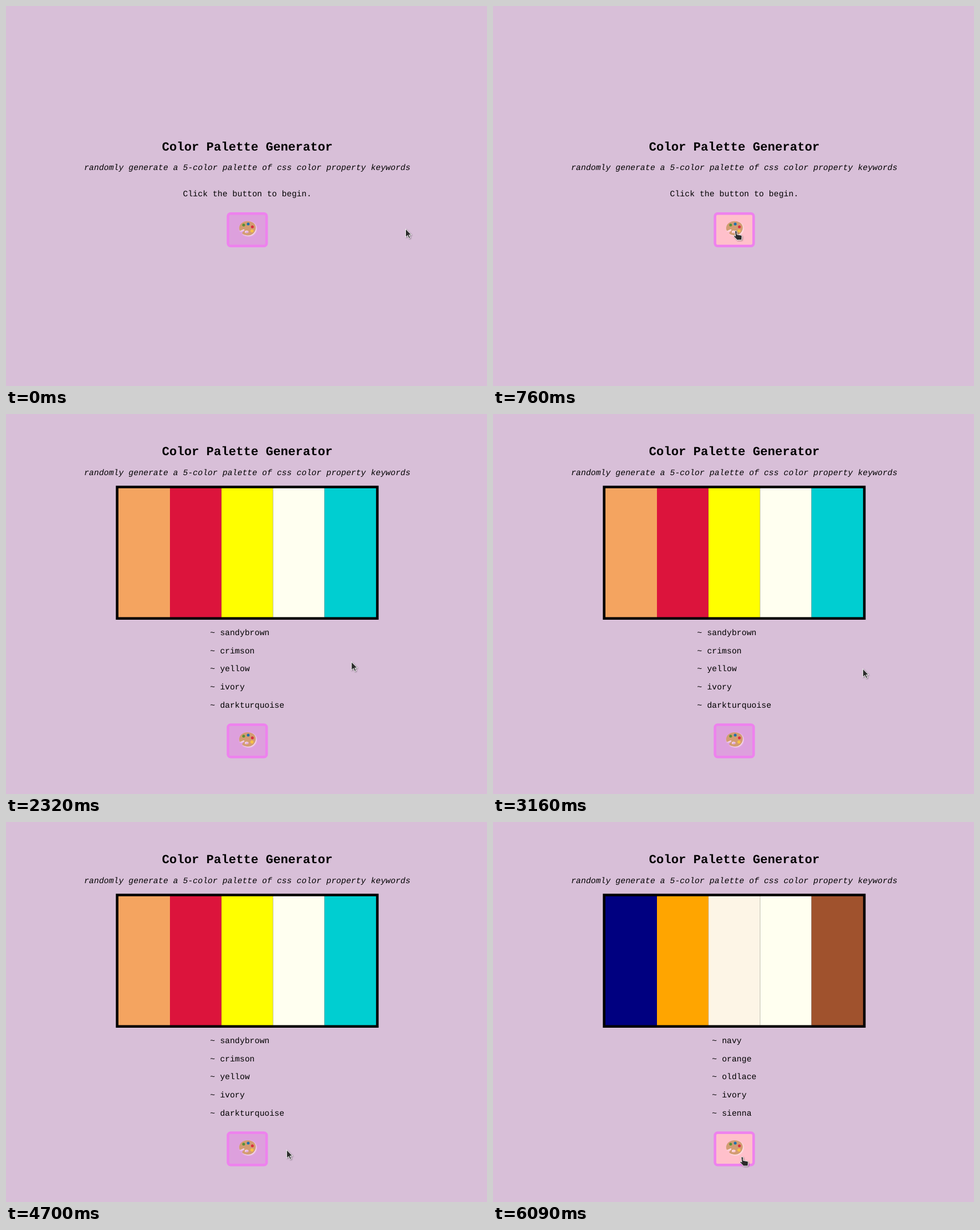
Write an HTML page that moves like this. It is 842 px wide and 665 px high and loops after 8000 ms.

```html
<!DOCTYPE html>
<html lang="en">
<head>
<meta charset="utf-8">
<title>Color Palette Generator</title>
<style>
  html, body { margin: 0; height: 100%; overflow: hidden; background: thistle; }
  svg { display: block; }
  text { font: 14.43px "Liberation Mono", monospace; text-rendering: geometricPrecision; white-space: pre; }
  .mid { text-anchor: middle; }
  .title { font-size: 21.65px; font-weight: bold; }
  .sub { font-style: italic; }
  .glow { filter: drop-shadow(1.4px 1.4px 1px #fff0f5); }
  .cursor { fill: #2b2b2b; stroke: #fff; stroke-width: 1; stroke-linejoin: round;
            filter: drop-shadow(1px 1px 1px #0006); }
</style>
</head>
<body>
<svg width="842" height="665" viewBox="0 0 842 665">
  <g id="head">
    <text class="mid title" x="422.3" y="72.3">Color Palette Generator</text>
    <text class="mid sub" x="422.3" y="106.8">randomly generate a 5-color palette of css color property keywords</text>
  </g>
  <text class="mid" id="prompt" x="422.3" y="333">Click the button to begin.</text>
  <g id="palette">
    <rect x="192.3" y="125.5" width="460" height="234.5"/>
    <g id="bars"></g>
    <g id="names"></g>
  </g>
  <g id="button">
    <rect id="face" x="388.6" y="363.3" width="67.6" height="56.6" rx="4.5" stroke="violet" stroke-width="4.5"/>
    <g class="glow">
      <path fill="#d39c72" fill-rule="evenodd" d="M408.8 392.5C406 385 412 376.5 423 376.5C432 376.5 437.8 382 437.3 389C436.5 397 430 402 423 401.5C417 401 413 399 413.5 397C414 395 417.8 394 417.3 391.5C416.8 389.5 413 392.5 411 393.2C410 393.5 409.2 393.3 408.8 392.5ZM418 395.3a3.3 2.2 0 1 0 6.6 0a3.3 2.2 0 1 0 -6.6 0Z"/>
      <circle cx="416" cy="383.3" r="2.5" fill="#5b9136"/>
      <circle cx="424" cy="381.6" r="2.5" fill="#1f6fae"/>
      <circle cx="431.3" cy="386.4" r="2.5" fill="#da2f3f"/>
      <circle cx="430.6" cy="393.6" r="2.7" fill="#f6c344"/>
    </g>
  </g>
  <path class="cursor" id="cursor"/>
</svg>
<script>
const LOOP = 8000, BAR = 90.2, SHIFT = 180.4;
const ARROW = "M.5 .5V15.2L4 12L6.4 17.2L8.8 16.2L6.4 11.2H10.8Z";
const HAND = "M0 0C1.3 0 1.9 .8 2 1.8V6.3L8.8 7.6C10.3 8 10.8 9 10.8 10.4L10.2 16H2.2C.6 13.6 -2.4 11 -3.6 9.4C-3.5 7.8 -1.8 7.8 -.6 9.3L-1.4 1.6C-1.4 .6 -.9 0 0 0Z";
const palettes = [
  [1620, "sandybrown crimson yellow ivory darkturquoise"],
  [6090, "navy orange oldlace ivory sienna"]
];
// Each move: first step time, last step time, step count, end x, end y
const start = [699, 389.5];
const moves = [
  [70, 760, 10, 425, 393.5],
  [2010, 2470, 7, 648.5, 443],
  [2720, 2720, 1, 647.3, 442],
  [3160, 3160, 1, 646.8, 445.3],
  [3220, 3540, 5, 573.5, 537],
  [3800, 3960, 3, 544, 557],
  [4040, 4190, 3, 504.5, 570],
  [4700, 5000, 5, 436, 586]
];

const $ = id => document.getElementById(id);
const smooth = p => p * p * (3 - 2 * p);

function pointer(t) {
  let [x, y] = start;
  for (const [from, to, steps, endX, endY] of moves) {
    if (t < from) break;
    const step = steps > 1 ? 1 + Math.floor((t - from) / (to - from) * (steps - 1) + 1e-6) : 1;
    const p = Math.min(1, step / steps), e = steps > 5 ? smooth(p) : p;
    x += (endX - x) * e;
    y += (endY - y) * e;
  }
  return [x, y];
}

let shown;
function showPalette(list) {
  if (list === shown) return;
  shown = list;
  const names = list.split(" ");
  const left = 422.3 - (Math.max(...names.map(n => n.length)) + 2) * 8.66 / 2;
  $("bars").innerHTML = names.map((n, i) =>
    `<rect x="${196.8 + i * BAR}" y="130" width="${BAR}" height="225.5" fill="${n}"/>`).join("");
  $("names").innerHTML = names.map((n, i) =>
    `<text x="${left}" y="${387.3 + i * 31.57}">~ ${n}</text>`).join("");
}

function draw(t) {
  const current = palettes.filter(p => t >= p[0]).pop();
  const drop = current ? SHIFT : 0;
  $("palette").style.display = current ? "" : "none";
  $("prompt").style.display = current ? "none" : "";
  $("head").setAttribute("transform", `translate(0 ${SHIFT - drop})`);
  $("button").setAttribute("transform", `translate(0 ${drop})`);
  if (current) showPalette(current[1]);

  const [x, y] = pointer(t);
  const hover = Math.abs(x - 422.4) < 36 && Math.abs(y - 391.6 - drop) < 30.5;
  $("face").setAttribute("fill", hover ? "pink" : "plum");
  $("cursor").setAttribute("d", hover ? HAND : ARROW);
  $("cursor").setAttribute("transform", `translate(${x} ${y})`);
}

const begin = performance.now();
function tick() {
  draw((performance.now() - begin) % LOOP);
  requestAnimationFrame(tick);
}
tick();
</script>
</body>
</html>
```
